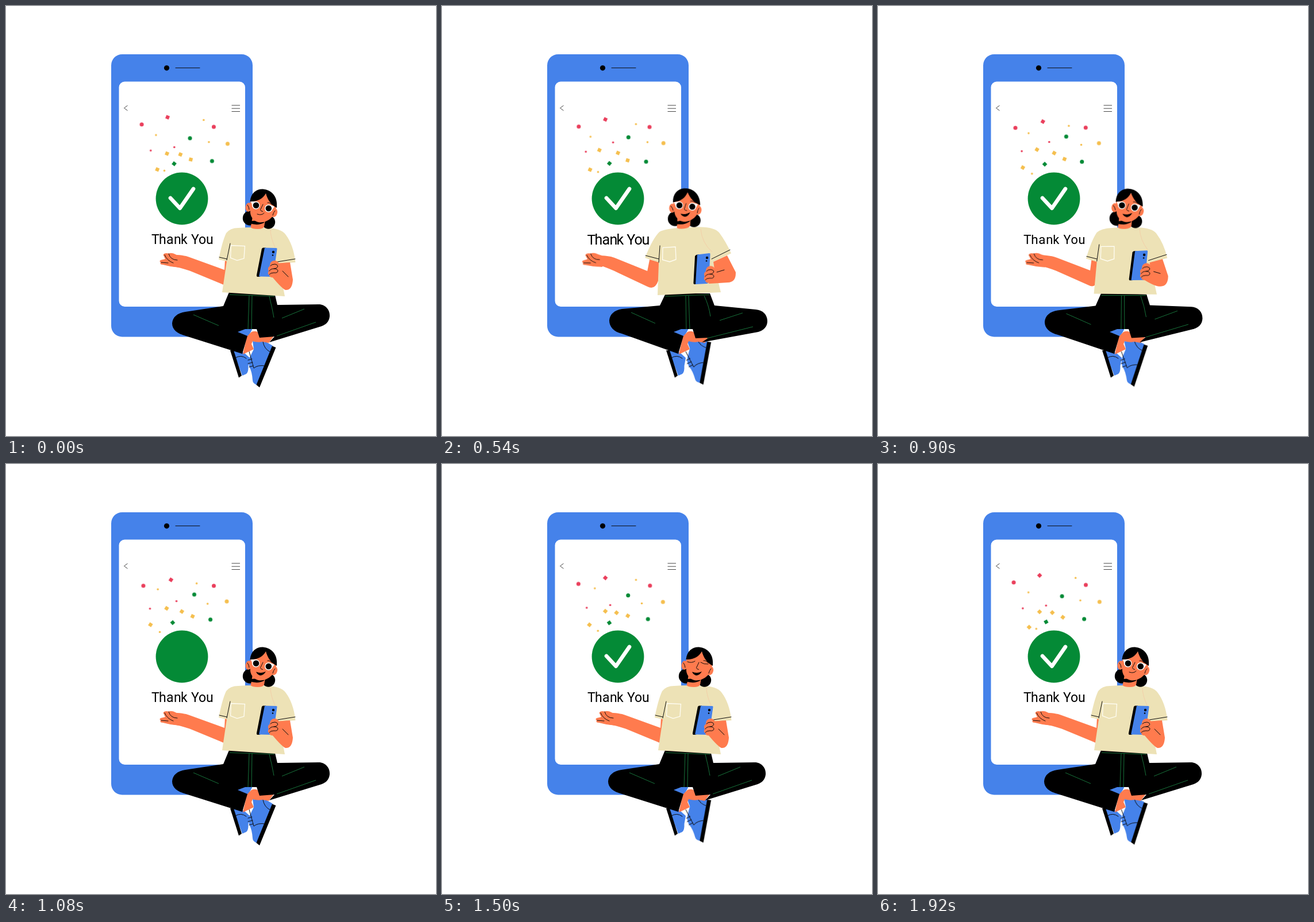
Write an HTML page without scripts that moves like this. It is 748 px wide and 748 px high and loops after 1980 ms.

```html
<!DOCTYPE html>
<html lang="en">
<head>
<meta charset="utf-8">
<title>Thank You</title>
<style>
html, body { margin: 0; width: 100%; height: 100%; overflow: hidden; background: #fff; }
svg { position: absolute; left: 0; top: 0; }
:root { --loop: 1.98s; --sine: cubic-bezier(.37, 0, .63, 1); }

.blue { fill: #4582ea; }
.skin { fill: #ff7b4e; }
.line { fill: none; stroke: #0c0c0c; stroke-width: 1; stroke-linecap: round; stroke-linejoin: round; }
.thin { stroke: #333; stroke-width: .9; stroke-linecap: butt; }
.seam { fill: none; stroke: #17713a; stroke-width: 1; }

/* body sway: --a is the resting outline, --b the leaning one */
.morph { d: var(--a); animation: morph var(--loop) ease-in-out infinite; }
.lean { animation: lean var(--loop) ease-in-out infinite; }
@keyframes morph {
  0%, 3%, 54.5%, 100% { d: var(--a); }
  29%, 36% { d: var(--b); }
}
@keyframes lean {
  0%, 3%, 54.5%, 100% { transform: none; }
  29%, 36% { transform: var(--to); }
}
.head { transform-origin: 446px 350px; --to: translate(-21.8px, -1.5px) rotate(-7.5deg); }
.palm { transform-origin: 284px 442px; --to: translate(-24px, 0) rotate(-3deg); }
.grip { --to: translate(0, 9.5px); }

.foot { transform-origin: 425px 596px; animation: foot var(--loop) ease-in-out infinite; }
@keyframes foot {
  0%, 3%, 54.5%, 100% { transform: none; }
  29%, 32%, 77%, 80% { transform: rotate(-12deg); }
  97% { transform: rotate(-4.3deg); }
}

.open-eye, .shut-eye, .smile, .grin { animation: var(--loop) step-end infinite; }
.open-eye { animation-name: hide-blink; }
.shut-eye { opacity: 0; animation-name: show-blink; }
.smile { animation-name: hide-grin; }
.grin { opacity: 0; animation-name: show-grin; }
@keyframes hide-blink { 72.7% { opacity: 0; } 78.8% { opacity: 1; } }
@keyframes show-blink { 72.7% { opacity: 1; } 78.8% { opacity: 0; } }
@keyframes hide-grin { 9% { opacity: 0; } 88% { opacity: 1; } }
@keyframes show-grin { 9% { opacity: 1; } 88% { opacity: 0; } }

.tick {
  fill: none; stroke: #fff; stroke-width: 6.6; stroke-linecap: round; stroke-linejoin: round;
  stroke-dasharray: 1 2; animation: tick var(--loop) linear infinite;
}
@keyframes tick {
  0%, 51% { stroke-dashoffset: 0; opacity: 1; }
  51.01%, 55.5% { stroke-dashoffset: 1; opacity: 0; }
  55.51% { stroke-dashoffset: 1; opacity: 1; }
  66%, 100% { stroke-dashoffset: 0; opacity: 1; }
}

/* confetti: sine drift on each axis; --r is the reach, --p the time of its peak */
.x, .y { animation: var(--loop) var(--sine) calc((var(--p) - 1980) * 1ms) infinite; }
.x { animation-name: drift-x; }
.y { animation-name: drift-y; }
@keyframes drift-x { 0%, 100% { transform: translateX(calc(var(--r) * 1px)); } 50% { transform: translateX(calc(var(--r) * -1px)); } }
@keyframes drift-y { 0%, 100% { transform: translateY(calc(var(--r) * 1px)); } 50% { transform: translateY(calc(var(--r) * -1px)); } }
.spin { animation: spin var(--loop) var(--sine) infinite; }
@keyframes spin { 0%, 100% { transform: rotate(22deg); } 50% { transform: rotate(47deg); } }
.red { fill: #ea3f5c; }
.gold { fill: #f5bf4f; }
.green { fill: #048a36; }

.thanks {
  position: absolute; left: 252.6px; top: 395.2px; white-space: nowrap; color: #000;
  font: 23px/24px Roboto, Arial, sans-serif;
}
.thanks span { display: inline-block; animation: swell var(--loop) ease-in-out calc(var(--i) * 15ms) infinite; }
.thanks .word { margin-left: .248em; }
.thanks .kern { margin-left: -.04em; }
@keyframes swell {
  0%, 3% { transform: none; }
  14% { transform: scale(1.12); }
  25% { transform: scale(1.09); }
  35%, 40% { transform: scale(.94); }
  48%, 100% { transform: none; }
}
</style>
</head>
<body>
<svg width="748" height="748" viewBox="0 0 748 748">
  <defs>
    <circle id="ball" r="3.5"/>
    <circle id="dot" r="1.8"/>
    <rect id="chip" class="spin" x="-3.1" y="-3.1" width="6.2" height="6.2"/>
  </defs>

  <!-- big phone -->
  <rect class="blue" x="183" y="84" width="246" height="491.5" rx="19"/>
  <rect x="196.5" y="131.5" width="219.5" height="391.5" rx="10" fill="#fff"/>
  <circle cx="279.5" cy="107.8" r="4.6"/>
  <path class="line" d="M295 107.7H337"/>
  <path class="line thin" d="M211.5 173L205.5 177.5L211.5 182"/>
  <path class="line thin" d="M392.5 172.8H407M392.5 178.2H407M392.5 183.5H407"/>

  <!-- confetti -->
  <g class="x" style="--r:1.5;--p:960"><g class="y" style="--r:3;--p:960"><use href="#ball" class="red" x="237.5" y="209"/></g></g>
  <g class="x" style="--r:3;--p:1020"><g class="y" style="--r:4;--p:1050"><g transform="translate(284 197.5)"><use href="#chip" class="red"/></g></g></g>
  <g class="x" style="--r:6.2;--p:30"><g class="y" style="--r:5.2;--p:900"><use href="#dot" class="gold" x="337.7" y="203.3"/></g></g>
  <g class="x" style="--r:.4;--p:1500"><g class="y" style="--r:1;--p:1200"><use href="#ball" class="red" x="361.4" y="211"/></g></g>
  <g class="x" style="--r:4;--p:1400"><g class="y" style="--r:6.3;--p:370"><use href="#dot" class="gold" x="262" y="222"/></g></g>
  <g class="x" style="--r:3.8;--p:1000"><g class="y" style="--r:1.5;--p:10"><use href="#ball" class="green" x="323.8" y="228.5"/></g></g>
  <g class="x" style="--r:5;--p:470"><g class="y" style="--r:4.2;--p:1250"><use href="#dot" class="gold" x="352.5" y="239.5"/></g></g>
  <g class="x" style="--r:.8;--p:200"><g class="y" style="--r:.8;--p:1650"><use href="#ball" class="gold" x="384.8" y="239.2"/></g></g>
  <g class="x" style="--r:1;--p:1750"><g class="y" style="--r:1.7;--p:560"><use href="#dot" class="red" x="251" y="251.7"/></g></g>
  <g class="x" style="--r:3.2;--p:740"><g class="y" style="--r:5.5;--p:1750"><use href="#dot" class="red" x="295" y="241.5"/></g></g>
  <g class="x" style="--r:5.2;--p:1550"><g class="y" style="--r:4;--p:1780"><g transform="translate(279 253.5)"><use href="#chip" class="gold"/></g></g></g>
  <g class="x" style="--r:1.8;--p:780"><g class="y" style="--r:1.8;--p:1680"><g transform="translate(304.8 257.2)"><use href="#chip" class="gold"/></g></g></g>
  <g class="x" style="--r:1.3;--p:60"><g class="y" style="--r:1.4;--p:1350"><g transform="translate(291.2 275) rotate(15)"><use href="#chip" class="green"/></g></g></g>
  <g class="x" style="--r:1.6;--p:1050"><g class="y" style="--r:2.4;--p:400"><g transform="translate(323 266.3) rotate(-8)"><use href="#chip" class="gold"/></g></g></g>
  <g class="x" style="--r:2.2;--p:1750"><g class="y" style="--r:.7;--p:760"><use href="#ball" class="green" x="356.7" y="270.3"/></g></g>
  <g class="x" style="--r:6;--p:60"><g class="y" style="--r:3.4;--p:290"><g transform="translate(257.3 282.3)"><use href="#chip" class="gold"/></g></g></g>
  <g class="x" style="--r:4;--p:40"><g class="y" style="--r:3;--p:1100"><use href="#dot" class="gold" x="271.5" y="289.3"/></g></g>

  <!-- badge -->
  <circle class="green" cx="306" cy="335" r="45.4"/>
  <path class="tick" pathLength="1" d="M286 334L302.5 351.8L326 318"/>

  <!-- back shoe -->
  <path class="blue" d="M394 598L411 643L418 640Q422 637 421.5 626L424 612L414 603Z"/>
  <path d="M390 599L396 599L410 643L405 646.5Z"/>
  <path class="line" d="M399 612Q409 606 418 613"/>
  <path class="blue" d="M403 566L416 562L428 562L420 578Z"/>

  <!-- front shoe -->
  <g class="foot">
    <path class="blue" d="M429 583Q439 585 447 581L464 591L438 660Q429 657 429 651Q428 636 423 627Q421 619 423 613L431 597Z"/>
    <path d="M463 591.5L469.5 594L441 663.5L435.5 659Z"/>
    <path class="line" d="M447 584Q449 597 460 602M423 601L431 630Q438 624 451 626M421 616L428 614M421 622L429 620M423 628L430 626"/>
  </g>

  <!-- ankles -->
  <path class="skin" d="M419 575L427 567Q436 563 441 571L443 576L466 574L457 586L446 584Q438 586 429 583L427 588L431 597L412 606Z"/>

  <!-- trousers -->
  <path class="morph" style="--a:path('M388 498L468 503L472 520L544 519C556 519 564 529 563 540C562 549 557 554 549 557L458 585L467 575L441 577L436 562L416 562L403 567L420 574L411 605L313 574C298 570 289 563 289 552C290 541 298 534 312 532L378 522Z');
    --b:path('M389 500L466 500L474 521L546 528C558 529 566 537 566 548C566 558 560 564 550 567L452 585L464 577L441 578L436 562L416 562L403 567L420 574L411 605L313 570C299 567 291 558 291 547C292 536 300 529 313 527L379 521Z')"/>
  <path class="seam morph" style="--a:path('M389 502L467 505M423 503L421 562M428 503L427 562M458 505Q463 525 466 542M326 537L370 556M480 543L519 527M471 574L539 550');
    --b:path('M388 505L465 502M424 504L425 562M429 504L431 562M456 504Q464 520 467 540M329 533L371 552M483 547L523 534M461 578L541 558')"/>

  <!-- presenting arm -->
  <path class="skin morph" style="--a:path('M294 433C306 433 315 435 322 438L380 459L381 441L392 444L388 478Q384 489 374 483L328 464C316 459 306 456 296 454Q285 453 278 448Z');
    --b:path('M271 434C283 434 292 435 300 438L357 461L361 441L380 446L376 478Q370 495 357 488L306 464C296 459 288 456 280 453Q265 453 255 448Z')"/>
  <g class="palm lean">
    <path class="skin" d="M302 435L297 433Q288 428 283 430.500Q275 429 273.500 433L277 440L269 442Q266 444 269 446Q267 450 273 450L286 453L302 455Z"/>
    <path class="line" d="M276 433Q280 443 291 447M283 431Q286 442 298 442M270 446L282 447"/>
  </g>

  <!-- shirt -->
  <path fill="#ede2b6" class="morph" style="--a:path('M404 386Q390 386 383 395Q376 410 370 441L384 444L376 498L485 505L474 448L503.5 446Q500 415 486 397Q478 387 455 386Q430 384 404 386Z');
    --b:path('M411 386Q386 388 378 393Q366 405 353 438L377 446L375 503L485 498L472 445L503 430Q494 410 482 394Q474 385 450 384.5Q430 384 411 386Z')"/>
  <path fill="none" stroke="#fffdf4" stroke-width="1.3" class="morph" style="--a:path('M391.5 416.5L415.5 417.5L414 439L402 442.5L390.5 438Z');
    --b:path('M384 420.5L406 419L407 441L396 445L383.5 441.5Z')"/>
  <path fill="none" stroke="#f3cfa8" stroke-width="1" class="morph" style="--a:path('M460 389Q460 402 468 420');--b:path('M450 388Q452 412 470 428')"/>

  <!-- holding arm and small phone -->
  <path class="skin morph" style="--a:path('M473 447.5L494 446L499 476Q498 494 487 494Q482 494 462 470L474 452Z');
    --b:path('M472 445L496 434L511 463Q512 480 497 481Q482 482 464 483L474 458Z')"/>
  <path class="line morph" style="--a:path('M371 437L384 440M390 413L384 442M472 445L503 440M481 461L491 471');
    --b:path('M354 434L377 440M379 417L377 446M469 440L501 424M478 463L491 459')"/>
  <path class="morph" style="--a:path('M447 420.5L452 420.5L442 471L437 471Q435.5 470 436 468L445 422Z');
    --b:path('M442 433L447 432L443 484L438.5 484Q437 483 437.5 481L440 435Z')"/>
  <path class="blue morph" style="--a:path('M450 420.5L470 421Q472 421 471.5 423L465 469Q464 471 462 471L440 470.5Z');
    --b:path('M444 432.5L465 430Q467 430 466.5 432L464 480Q463 483 461 483L441 484Z')"/>
  <g class="lean" style="--to:translate(-4px,10px)"><circle cx="465" cy="428" r="2.2"/><circle cx="464" cy="433.5" r="1.3"/></g>
  <g class="grip lean">
    <path class="skin" d="M463 444Q468 441 473 445Q476 449 473 453L477 461Q474 472 466 472Q458 473 458 468Q454 466 457 461Q454 456 459 452Q459 446 463 444Z"/>
    <path class="line" d="M460 452Q462 449 468 449Q473 450 473 453Q471 457 466 457Q460 457 458 461M466 457Q473 457 473 461Q472 465 466 464Q460 464 458 467"/>
  </g>

  <!-- head -->
  <g class="head lean">
    <circle cx="424.500" cy="369" r="12.700"/>
    <circle cx="456.500" cy="376" r="11.700"/>
    <path class="skin" d="M429 366L451 372L449 384Q447 388 438 388Q428 388 425.500 385L427 378Z"/>
    <path d="M427 374L450 372L449 377Q440 382 427 379Z"/>
    <ellipse class="skin" cx="422" cy="350" rx="5.500" ry="7.800" transform="rotate(8 422 350)"/>
    <ellipse class="skin" cx="466.500" cy="359.500" rx="5.500" ry="7.800" transform="rotate(14 466.500 359.500)"/>
    <path class="skin" d="M425 338L448 322L470 348C470 364 457 376.500 442 376.500C432 376 426 368 425 360Z"/>
    <path d="M424.500 340C426 325 436 318 447 318.500C463 320 473 332 471 351C461 346 455 337 452 326C447 335 437 341 424.500 340Z"/>
    <path class="line" d="M420 346Q423 350 423 354M468 356Q465 359 464 364M447 345L442.500 354.500Q443 357 446.500 357.500M455 342Q459 341 463 346"/>
    <g class="open-eye">
      <path fill="#fff" d="M426 340L437 340L429 349ZM460 346L467 349L462 356Z"/>
      <circle cx="434.700" cy="346.700" r="6.800" fill="#fff"/><circle cx="456.800" cy="352" r="6.800" fill="#fff"/>
      <circle cx="435" cy="346.800" r="5.300"/><circle cx="456.800" cy="352" r="5.300"/>
    </g>
    <path class="line shut-eye" d="M427 344Q434 347 440 343M450 345Q456 349 463 348"/>
    <path class="line smile" d="M437 362Q445 365 449 360"/>
    <path class="grin" d="M435 361.500Q444 365 452 361Q447 369 441 367.500Q437 366 435 361.500Z"/>
  </g>
</svg>
<div class="thanks"><span style="--i:0">T</span><span style="--i:1">h</span><span style="--i:2">a</span><span style="--i:3">n</span><span style="--i:4">k</span><span class="word" style="--i:5">Y</span><span class="kern" style="--i:6">o</span><span style="--i:7">u</span></div>
</body>
</html>
```
